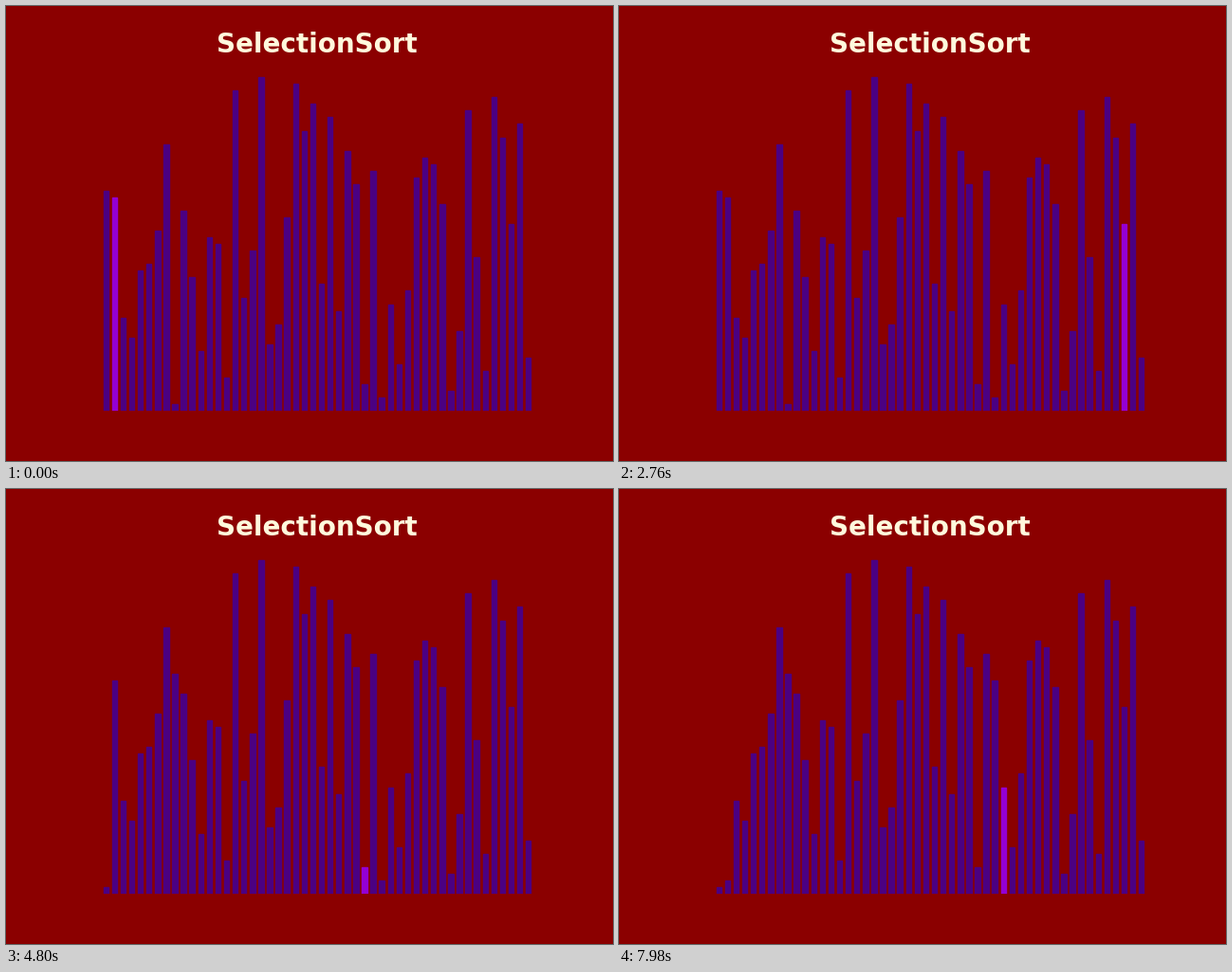
These frames come from a looping animation (640x480 px, 8000 ms). A matplotlib script:

```python
import matplotlib.pyplot as plt
import numpy as np
from matplotlib.animation import FuncAnimation

BACK, BAR, ACTIVE, TITLE = "darkred", "indigo", "darkviolet", "cornsilk"
TICK, LOOP, STEP = 20, 8000, 60  # ms
N = 50

# Every second height; the others follow from them.
KEYS = [33, 14, 21, 27, 1, 20, 26, 5, 17, 50, 13, 49, 46,
        44, 39, 4, 2, 7, 35, 37, 3, 45, 6, 41, 43]


def mixed_heights():
    """Heights 1..N: key bars, with the unused heights ranked along a wave."""
    rest = sorted(set(range(1, N + 1)) - set(KEYS))
    wave = np.cos(2 * np.pi * (np.arange(len(rest)) - 3.2) / 3.8)
    between = np.empty(len(rest), int)
    between[np.argsort(wave, kind="stable")] = rest
    return np.column_stack([KEYS, between]).ravel()


def selection_sort(values):
    """Yield (array, touched index) for every access."""
    a = list(values)
    for i in range(N - 1):
        if i:
            yield a[:], i
        low = i
        for j in range(i + 1, N):
            if a[j] < a[low]:
                low = j
            yield a[:], j
        a[i], a[low] = a[low], a[i]
        yield a[:], i
        yield a[:], low


heights = mixed_heights()
steps = list(selection_sort(heights))

fig, ax = plt.subplots(figsize=(6.4, 4.8), dpi=100, facecolor=BACK)
bars = ax.bar(range(N), heights, width=0.6, linewidth=1)
ax.set_title("SelectionSort", fontsize=20, fontweight="bold",
             fontfamily="DejaVu Sans", color=TITLE)
ax.axis("off")


def update(frame):
    current, touched = steps[frame * TICK // STEP]
    for k, (bar, h) in enumerate(zip(bars, current)):
        bar.set_height(h)
        bar.set_color(ACTIVE if k == touched else BAR)
    return list(bars)


anim = FuncAnimation(fig, update, frames=LOOP // TICK, interval=TICK,
                     repeat=True, repeat_delay=0)
plt.show()
```
